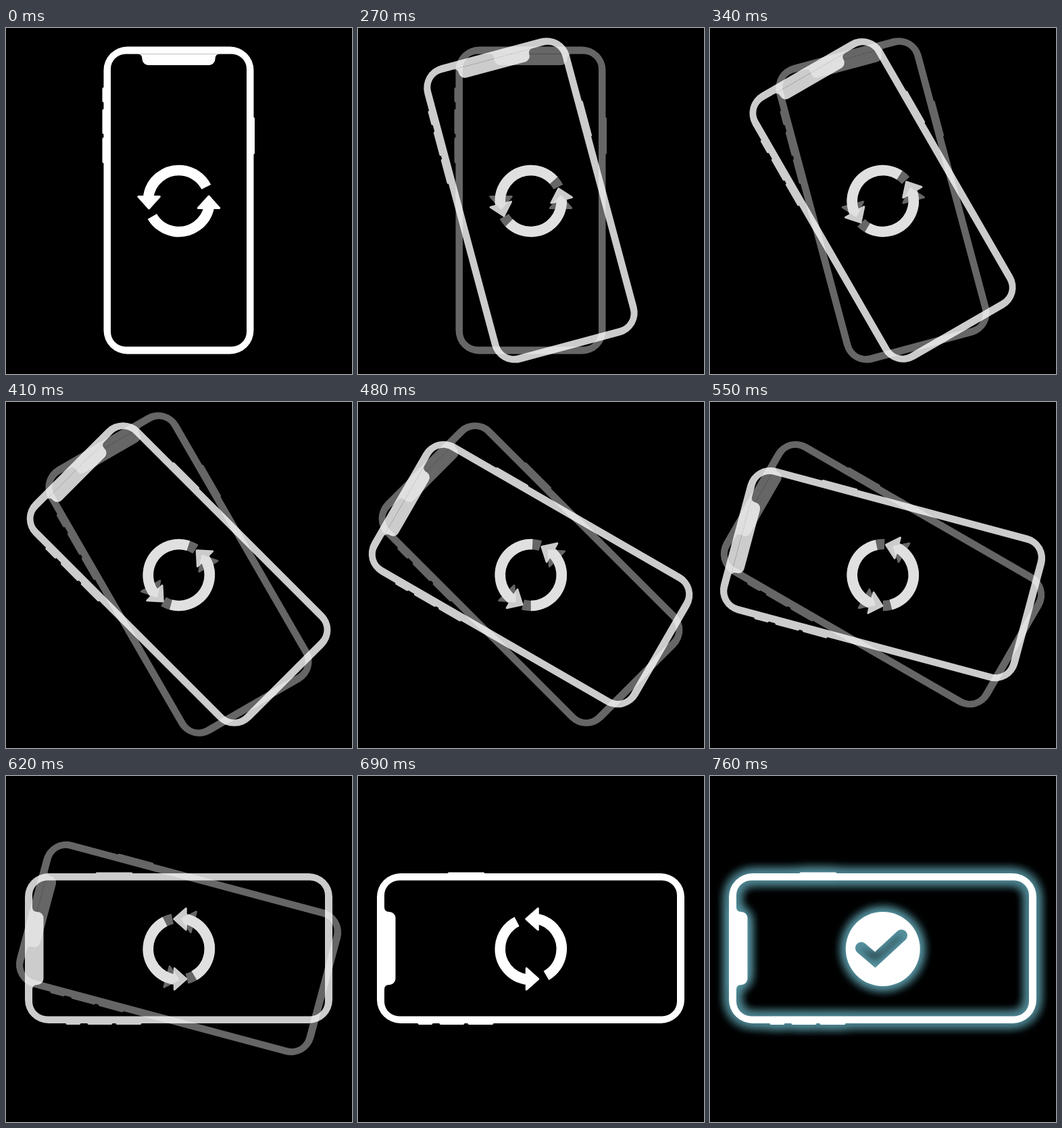
These frames come from a looping animation (512 px wide and 512 px high, 1.56 s). An HTML page with a canvas:

```html
<!DOCTYPE html>
<html lang="en">
<head>
<meta charset="utf-8">
<title>Rotate your phone</title>
<style>
html, body { margin: 0; width: 100%; height: 100%; overflow: hidden; background: #000; }
canvas { display: block; width: 512px; height: 512px; }
</style>
</head>
<body>
<canvas id="stage" width="512" height="512"></canvas>
<script>
const SIZE = 512, LOOP = 1560;
const TURN_START = 270, STEP = 70, STEP_ANGLE = 15, QUARTER = 90;
const TURN_END = 690, DONE = 760;
const RAD = Math.PI / 180;

const stage = document.getElementById('stage').getContext('2d');
const layer = document.createElement('canvas');
layer.width = layer.height = SIZE;
const art = layer.getContext('2d');

function fillRound(x, y, w, h, r) {
  art.beginPath();
  art.roundRect(x, y, w, h, r);
  art.fill();
}

// Draws around (cx, cy), turned counter-clockwise.
function turned(cx, cy, degrees, draw) {
  art.save();
  art.translate(cx, cy);
  art.rotate(-degrees * RAD);
  draw();
  art.restore();
}

function drawNotch() {
  const top = -216.5, bottom = -200, half = 54;
  art.beginPath();
  art.moveTo(-half - 7, top);
  art.quadraticCurveTo(-half, top, -half, top + 7);
  art.arcTo(-half, bottom, 0, bottom, 9);
  art.arcTo(half, bottom, half, top, 9);
  art.lineTo(half, top + 7);
  art.quadraticCurveTo(half, top, half + 7, top);
  art.fill();
}

function drawPhone() {
  fillRound(-113, -167, 6, 22, 2);
  fillRound(-113, -135, 6, 37, 2);
  fillRound(-113, -93, 6, 38, 2);
  fillRound(106.5, -123, 6, 55, 2);
  art.beginPath();
  art.roundRect(-111, -227.5, 222, 455, 35);
  art.roundRect(-100.5, -216.5, 201, 433, 22);
  art.fill('evenodd');
  drawNotch();
}

function drawArrow(sign, from, to) {
  art.lineWidth = 15.5;
  art.beginPath();
  art.arc(0, 0, 45.5, from * RAD, to * RAD);
  art.stroke();
  art.lineWidth = 3;
  art.lineJoin = 'round';
  art.beginPath();
  art.moveTo(-60 * sign, 2 - 8.5 * sign);
  art.lineTo(-28.5 * sign, 2 - 8.5 * sign);
  art.lineTo(-44.3 * sign, 2 + 9 * sign);
  art.closePath();
  art.fill();
  art.stroke();
}

function drawArrows() {
  drawArrow(1, 186, 333);
  drawArrow(-1, 10, 150);
}

function drawCheck() {
  art.beginPath();
  art.arc(0, 0, 55, 0, 2 * Math.PI);
  art.fill();
  art.globalCompositeOperation = 'destination-out';
  art.lineWidth = 17.5;
  art.lineCap = 'round';
  art.lineJoin = 'miter';
  art.beginPath();
  art.moveTo(-32, -1.5);
  art.lineTo(-11.5, 16);
  art.lineTo(27.5, -20);
  art.stroke();
}

function render(angle, drawIcon) {
  art.clearRect(0, 0, SIZE, SIZE);
  art.fillStyle = art.strokeStyle = '#fff';
  turned(255.5, 255, angle, drawPhone);
  turned(255.8, 256, drawIcon === drawCheck ? 0 : angle, drawIcon);
}

function stamp(angle, alpha) {
  render(angle, drawArrows);
  stage.globalAlpha = alpha;
  stage.drawImage(layer, 0, 0);
  stage.globalAlpha = 1;
}

function drawDone() {
  render(QUARTER, drawCheck);
  stage.save();
  stage.shadowColor = 'rgb(86, 148, 161)';
  stage.shadowBlur = 18;
  stage.shadowOffsetX = SIZE * 2;
  for (let i = 0; i < 4; i++) stage.drawImage(layer, -SIZE * 2, 0);
  stage.restore();
  stage.drawImage(layer, 0, 0);
}

function drawAt(time) {
  stage.fillStyle = '#000';
  stage.fillRect(0, 0, SIZE, SIZE);
  if (time < TURN_START) stamp(0, 1);
  else if (time < TURN_END) {
    const step = Math.floor((time - TURN_START) / STEP);
    stamp(step * STEP_ANGLE, 0.4);
    stamp((step + 1) * STEP_ANGLE, 0.8);
  } else if (time < DONE) stamp(QUARTER, 1);
  else drawDone();
}

const start = performance.now();
function tick() {
  drawAt((performance.now() - start) % LOOP);
  requestAnimationFrame(tick);
}
tick();
</script>
</body>
</html>
```
